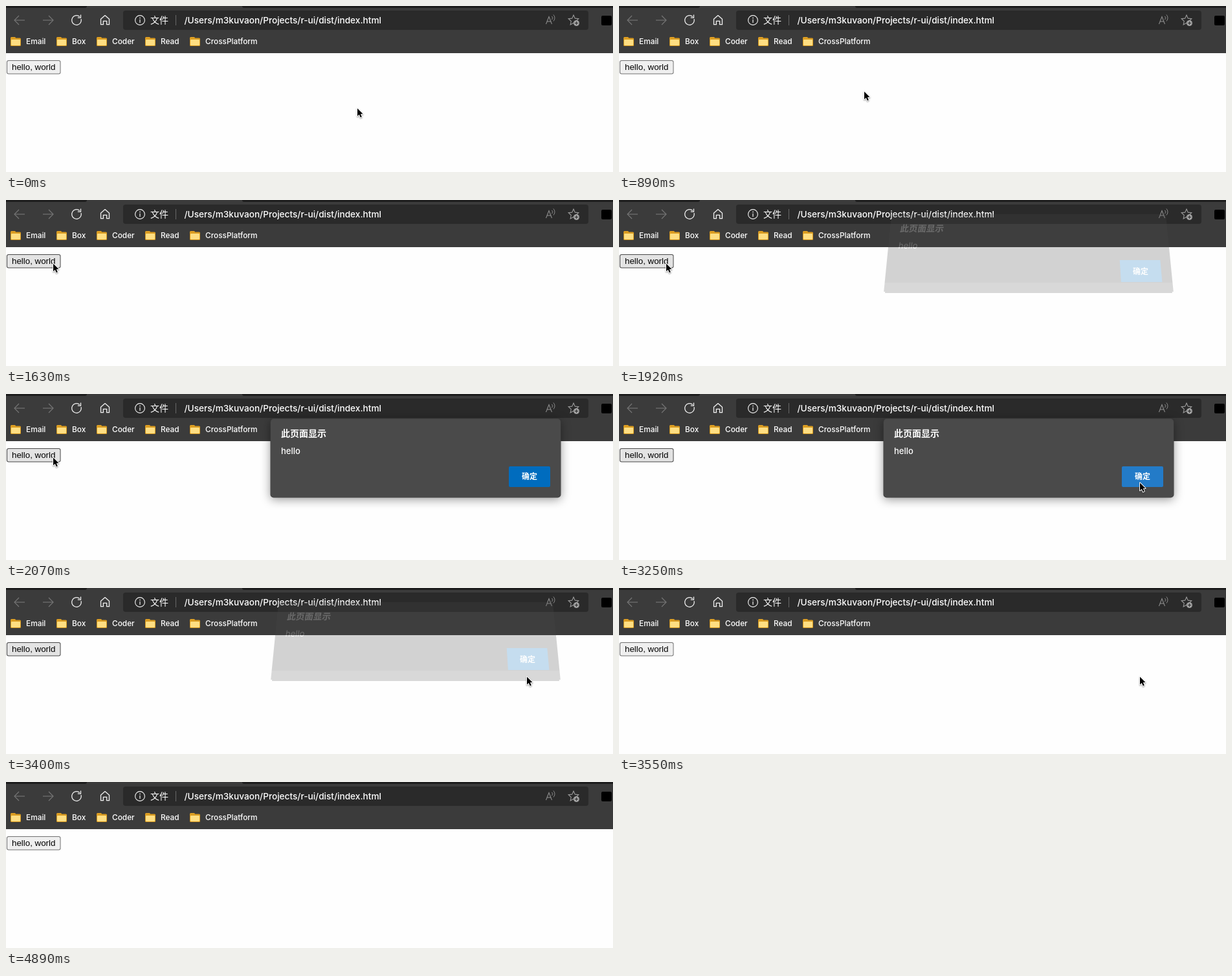
Recreate the animation shown at these times as an HTML page with a canvas. Size 938x257 px, loop 4.99 s.

```html
<!DOCTYPE html>
<html lang="zh">
<head>
<meta charset="utf-8">
<title>hello, world</title>
<style>
html, body { margin: 0; width: 100%; height: 100%; overflow: hidden; background: #fefefe; }
canvas { display: block; width: 938px; height: 257px; }
</style>
</head>
<body>
<canvas id="stage" width="938" height="257"></canvas>
<script>
const W = 938, H = 257, LOOP = 4990, STEP = 148;
const stage = document.getElementById('stage').getContext('2d');
const layer = document.createElement('canvas');
layer.width = W;
layer.height = H;
const ghost = layer.getContext('2d');
let g = stage;

const CJK = '"Noto Sans CJK SC", "Noto Sans CJK", sans-serif';
const UI = '"Inter", ' + CJK;
const ARIAL = '"Liberation Sans", Arial, sans-serif';
const ICON = '#f2f2f2', FAINT = '#8c8c8c';

const HOME = { x: 542, y: 157 }, PAGE_BUTTON = { x: 72, y: 97 }, OK_BUTTON = { x: 804, y: 136 };
const easeIn = p => p ** 1.8;
const easeOut = p => 1 - (1 - p) ** 2;

// Each pointer trip speeds up to a midpoint, may pause, then slows into its goal
const TRIPS = [
  { start: 4, mid: 7, pause: 1, end: 11, from: HOME, via: { x: 201, y: 104 }, to: PAGE_BUTTON },
  { start: 15, mid: 17, pause: 1, end: 21, from: PAGE_BUTTON, via: { x: 721, y: 183 }, to: OK_BUTTON },
  { start: 25, mid: 27, pause: 0, end: 29, from: OK_BUTTON, via: { x: 877, y: 215 }, to: { x: 900, y: 246 } }
];

function glide(a, b, p) {
  return { x: Math.round(a.x + (b.x - a.x) * p), y: Math.round(a.y + (b.y - a.y) * p) };
}

function pointerAt(step) {
  const trip = TRIPS.findLast(({ start }) => start <= step);
  if (!trip) return HOME;
  const { start, mid, pause, end, from, via, to } = trip;
  if (step <= mid) return glide(from, via, easeIn((step - start) / (mid - start)));
  const p = (step - mid - pause) / (end - mid - pause);
  return glide(via, to, easeOut(Math.min(1, p)));
}

function rect(x, y, w, h, color, r = 0) {
  g.fillStyle = color;
  g.beginPath();
  g.roundRect(x, y, w, h, r);
  g.fill();
}

function trace(points, close) {
  g.beginPath();
  points.forEach(([x, y]) => g.lineTo(x, y));
  if (close) g.closePath();
}

function outline(color, width) {
  g.strokeStyle = color;
  g.lineWidth = width;
  g.stroke();
}

function line(color, width, ...points) {
  trace(points);
  outline(color, width);
}

function arc(x, y, r, color, width, from = 0, to = Math.PI * 2) {
  g.beginPath();
  g.arc(x, y, r, from, to);
  outline(color, width);
}

function text(str, x, y, size, { color = '#fff', weight = 400, family = UI } = {}) {
  g.font = `${weight} ${size}px ${family}`;
  g.fillStyle = color;
  g.fillText(str, x, y);
  return g.measureText(str).width;
}

const BOLD = { weight: 700, family: CJK };

function arrow(x, dir) {
  const tip = x + dir * 8, barb = x + dir;
  line('#777', 1.1, [x - dir * 8, 22], [tip, 22]);
  line('#777', 1.1, [barb, 15], [tip, 22], [barb, 29]);
}

function reload() {
  arc(109, 22, 7.3, ICON, 1.3, -0.25, Math.PI * 2 - 0.85);
  line(ICON, 1.3, [115.5, 13.5], [115.5, 18.2], [110.8, 18.2]);
}

function home() {
  const half = (side) => line(ICON, 1.3, ...[[0, 14.5], [6.5, 20.3], [6.5, 28.6], [2.6, 28.6], [2.6, 23.4], [0, 23.4]]
    .map(([x, y]) => [153 + side * x, y]));
  half(-1);
  half(1);
}

function info() {
  arc(207, 22, 7.4, ICON, 1.1);
  rect(206.4, 20.8, 1.2, 5.2, ICON);
  rect(206.3, 17.8, 1.5, 1.5, ICON);
}

function readAloud() {
  line(FAINT, 1.1, [834.5, 28], [839, 16.5], [843.5, 28]);
  line(FAINT, 1.1, [836, 24], [842, 24]);
  for (const r of [3.6, 7]) arc(841, 18.5, r, FAINT, 1, -0.8, 0.8);
}

function star() {
  const points = Array.from({ length: 10 }, (_, i) => {
    const a = -Math.PI / 2 + i * Math.PI / 5, r = i % 2 ? 3.9 : 8.2;
    return [877 + r * Math.cos(a), 22.3 + r * Math.sin(a)];
  });
  trace(points, true);
  outline('#999', 1.1);
  rect(877, 22, 9, 9, '#a0a0a0', 4.5);
  rect(879, 26, 5, 1, '#2b2b2b');
  rect(881, 24, 1, 5, '#2b2b2b');
}

function folder(x) {
  rect(x, 48, 8, 6, '#e0a024', 1.5);
  rect(x, 49.5, 16, 12.5, '#d99b20', 1.5);
  rect(x + 1, 52, 14, 9, '#ffde82', 1);
}

function bookmarks() {
  let x = 7;
  for (const label of ['Email', 'Box', 'Coder', 'Read', 'CrossPlatform']) {
    folder(x);
    x += 24 + text(label, x + 24, 59, 11.85, { weight: 500 }) + 16.5;
    x = Math.round(x);
  }
}

function browser() {
  rect(0, 0, W, H, '#fefefe');
  rect(0, 0, W, 73, '#3b3b3b');
  rect(0, 0, 125, 3, '#1e1e1e', [0, 0, 3, 0]);
  rect(365, 0, W - 365, 3, '#1e1e1e', [0, 0, 0, 3]);
  rect(181, 7, 719, 30, '#2a2a2a', 4);
  arrow(21, -1);
  arrow(65, 1);
  reload();
  home();
  info();
  text('文件', 223, 27, 14, { weight: 500, family: CJK });
  rect(262, 14, 1, 16, '#686868');
  text('/Users/m3kuvaon/Projects/r-ui/dist/index.html', 275.5, 27, 13.65, { weight: 500 });
  readAloud();
  star();
  rect(920, 15, 16, 15, '#000', 2);
  bookmarks();
}

function pageButton(hover) {
  rect(1, 84, 83.5, 21.5, hover ? '#474747' : '#707070', 3);
  rect(2, 85, 81.5, 19.5, hover ? '#e3e3e3' : '#efefef', 2);
  text('hello, world', 9, 99, 13.333, { color: '#000', family: ARIAL });
}

function dialog(hover) {
  g.save();
  g.shadowColor = 'rgba(0,0,0,.4)';
  g.shadowBlur = 15;
  g.shadowOffsetY = 3;
  rect(408.5, 38, 449, 122.5, '#3c3c3c', 5);
  g.restore();
  rect(409, 38.5, 448, 121.5, '#4a4a4a', 5);
  text('此页面显示', 425, 66, 14, BOLD);
  text('hello', 425, 93, 13, { weight: 500 });
  rect(777, 112, 64, 32, hover ? '#237bc8' : '#006cbe', 2);
  text('确定', 797, 132, 12, BOLD);
}

// Narrows the dialog toward its top edge
const lean = (x, y) => 633 + (x - 633) * (0.946 + 0.054 * (y - 22) / 122);

function panel(left, top, right, bottom, color) {
  trace([[left, top], [right, top], [right, bottom], [left, bottom]].map(([x, y]) => [lean(x, y), y]), true);
  g.fillStyle = color;
  g.fill();
}

function leaningText(str, x, y, size, style) {
  g.save();
  g.transform(1, 0, -0.17, 1, lean(x, y), y);
  text(str, 0, 0, size, style);
  g.restore();
}

// The dialog tilted back and nearly transparent, while opening or closing
function tiltedDialog() {
  g = ghost;
  g.clearRect(0, 0, W, H);
  panel(409, 22, 857, 128, '#4a4a4a');
  panel(409, 128, 857, 142, '#636363');
  panel(411, 142, 855, 144, '#636363');
  leaningText('此页面显示', 425, 49, 13.5, BOLD);
  leaningText('hello', 425, 75, 13);
  panel(777, 93, 841, 127, '#1478c4');
  text('确定', 794, 115, 12, BOLD);
  g = stage;
  g.globalAlpha = 0.24;
  g.drawImage(layer, 0, 0);
  g.globalAlpha = 1;
}

function pointer({ x, y }) {
  g.save();
  g.translate(x, y);
  trace([[1, 1.5], [1, 13.6], [3.8, 11], [5.8, 15.6], [7.8, 14.7], [5.9, 10.3], [9.5, 10]], true);
  g.lineJoin = 'round';
  g.shadowColor = 'rgba(0,0,0,.4)';
  g.shadowBlur = 2;
  g.shadowOffsetY = 1;
  outline('#fff', 2);
  g.shadowColor = 'transparent';
  g.fillStyle = '#000';
  g.fill();
  g.restore();
}

function draw(t) {
  const step = Math.floor((t + 8) / STEP);
  const during = (from, to) => step >= from && step < to;
  browser();
  pageButton(during(11, 24));
  if (step === 13 || step === 23) tiltedDialog();
  if (during(14, 23)) dialog(step >= 21);
  if (step < 30) pointer(pointerAt(step));
}

const begin = performance.now();
function tick() {
  draw((performance.now() - begin) % LOOP);
  requestAnimationFrame(tick);
}
tick();
</script>
</body>
</html>
```
